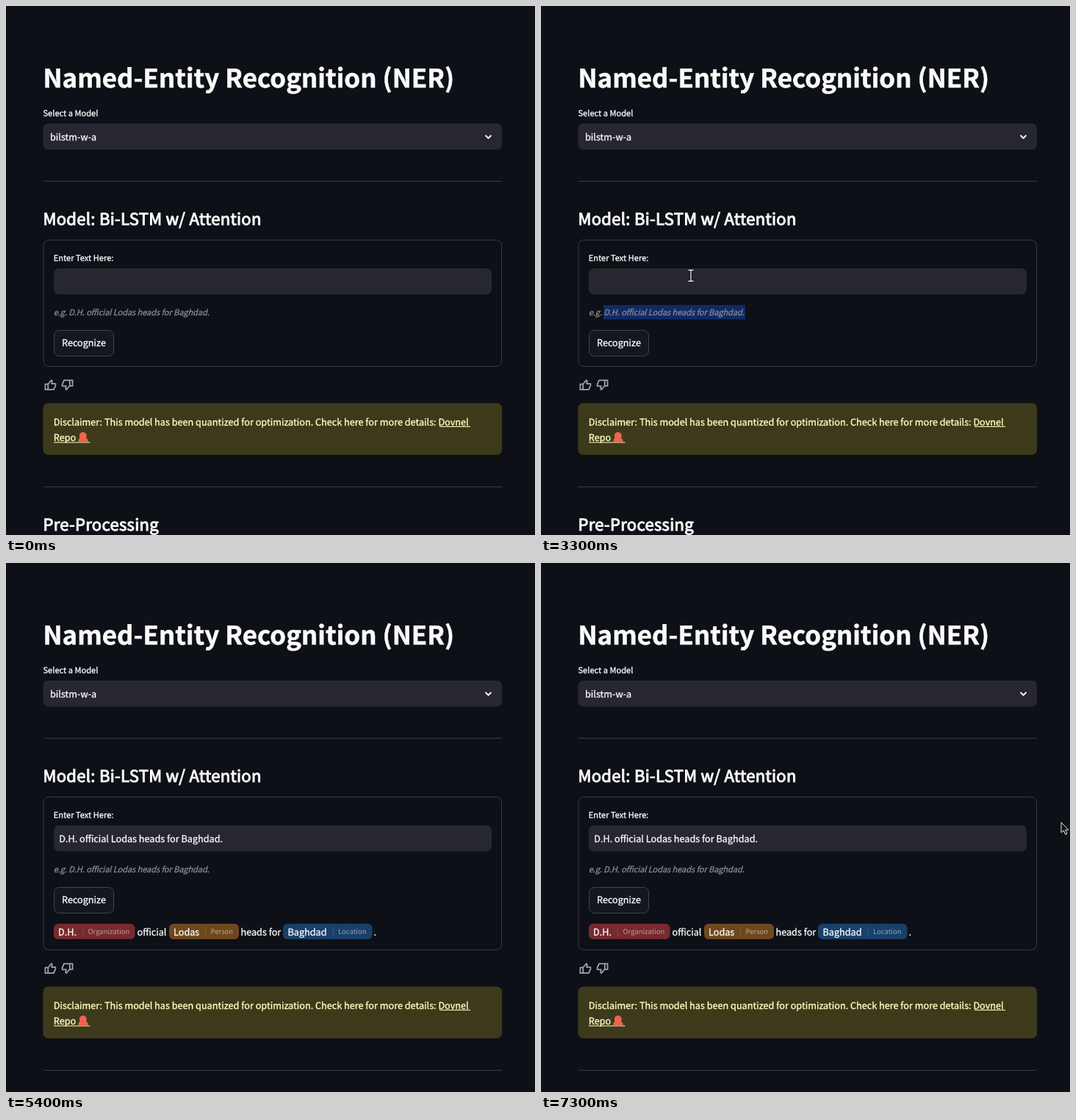
An HTML page that plays this animation: 720 px wide and 720 px high, repeating every 7400 ms.

```html
<!DOCTYPE html>
<html lang="en">
<head>
<meta charset="utf-8">
<title>Named-Entity Recognition</title>
<style>
  html, body { margin: 0; width: 100%; height: 100%; overflow: hidden; background: #0e1017; }
  svg { display: block; width: 100%; height: 100%; }
  text {
    font: 12.66px "Noto Sans CJK JP", "Noto Sans CJK SC", "Noto Sans CJK", "Noto Sans", sans-serif;
    fill: #fafafa; stroke: #fafafa; stroke-width: .32px;
    text-rendering: geometricPrecision;
  }
  .title { font-size: 34.8px; font-weight: 700; letter-spacing: .06px; stroke-width: .6px; }
  .heading { font-size: 22.1px; letter-spacing: .26px; stroke-width: 1px; }
  .label { font-size: 11.08px; }
  .caption { font-size: 11.08px; font-style: italic; letter-spacing: -.1px; fill: #87888c; stroke: #87888c; }
  .hint { font-size: 9.5px; fill: #9fa0a5; stroke: none; }
  .tag { font-size: 9.5px; fill: #fff; fill-opacity: .52; stroke: none; }
  .note { fill: #ffffc2; stroke: #ffffc2; }
  .widget { fill: #262730; }
  .line { fill: none; stroke: #393b41; }
  .icon { fill: none; stroke: #a3a4a7; stroke-width: 2.5; stroke-linejoin: round; }
  .button rect { fill: #131720; stroke: #41444c; }
  .button.hot rect { stroke: #ec4a45; }
  .button.hot text { fill: #ec4a45; stroke: #ec4a45; }
</style>
</head>
<body>
<svg viewBox="0 0 720 720">
  <defs>
    <path id="thumb" class="icon" d="M2 10H7.500V21H2ZM7.500 10L14 2.500L15.500 4L14.500 9.500H22V13L18.500 21H7.500"/>
  </defs>

  <text class="title" x="50.400" y="111">Named-Entity Recognition (NER)</text>
  <text class="label" x="50.500" y="150">Select a Model</text>
  <rect class="widget" x="50.500" y="160" width="624.500" height="35.500" rx="7"/>
  <text x="60" y="183">bilstm-w-a</text>
  <path d="M652.500 176l4 4 4-4" fill="none" stroke="#fafafa" stroke-width="1.900"/>
  <path class="line" d="M51 238.500H675"/>

  <text class="heading" x="50.500" y="298">Model: Bi-LSTM w/ Attention</text>
  <rect id="form" class="line" x="51" y="318.500" width="623.500" height="172" rx="7"/>
  <text class="label" x="64.800" y="347">Enter Text Here:</text>
  <rect class="widget" x="65" y="357" width="596" height="35.500" rx="7"/>
  <g id="focus">
    <rect x="65.400" y="357.500" width="595.200" height="34.500" rx="7" fill="none" stroke="#e24749"/>
    <path id="caret" d="M296.500 367V384" stroke="#fafafa"/>
  </g>
  <g id="pasted">
    <text x="72.200" y="380">D.H. official Lodas heads for Baghdad.</text>
    <g id="entry">
      <path id="squiggle" fill="none" stroke="#d8343c"/>
      <text class="hint" x="535.800" y="388">Press Enter to submit form</text>
    </g>
  </g>

  <rect id="selection" y="407" height="19.500" fill="#0f2a66"/>
  <text class="caption" x="64.800" y="421">e.g. D.H. official Lodas heads for Baghdad.</text>
  <g id="button" class="button">
    <rect x="65.500" y="441.500" width="81" height="35" rx="7"/>
    <text x="76" y="463">Recognize</text>
  </g>

  <g id="result">
    <rect x="65" y="491" width="110.500" height="21" rx="6" fill="#762a2f"/>
    <rect x="222" y="491" width="95" height="21" rx="6" fill="#6e481d"/>
    <rect x="377" y="491" width="121.500" height="21" rx="6" fill="#193f6b"/>
    <path d="M104.500 495V508M271.500 495V508M445.500 495V508" stroke="#fff" stroke-opacity=".12"/>
    <text x="71" y="507">D.H.</text><text class="tag" x="111.500" y="505">Organization</text>
    <text x="178.500" y="507">official</text>
    <text x="228" y="507">Lodas</text><text class="tag" x="278.500" y="505">Person</text>
    <text x="319.500" y="507">heads for</text>
    <text x="383.500" y="507">Baghdad</text><text class="tag" x="452" y="505">Location</text>
    <text x="500.500" y="507">.</text>
  </g>

  <g id="below">
    <use href="#thumb" transform="translate(52 507.500) scale(.7)"/>
    <use href="#thumb" transform="translate(92 524) rotate(180) scale(.7)"/>
    <rect x="50.500" y="540.500" width="624.500" height="70.500" rx="7" fill="#3d3a1b"/>
    <text class="note" x="64.800" y="570.500">Disclaimer: This model has been quantized for optimization. Check here for more details: Dovnel</text>
    <text class="note" x="64.800" y="592">Repo</text>
    <path d="M590 572.500H632M65 594H114.500" stroke="#ffffc2"/>
    <g fill="#f0634f">
      <circle cx="104.800" cy="585" r="5"/>
      <path d="M101 587H108.500L111.500 590.500V593.500H98.500V590.500Z"/>
    </g>
    <path class="line" d="M51 654.500H675"/>
    <text class="heading" x="50.500" y="714">Pre-Processing</text>
  </g>

  <g id="beam" fill="none">
    <path d="M-3-7.500H3M-3 7.500H3M0-7.500V7.500" stroke="#0b0c10" stroke-width="3.400"/>
    <path d="M-3.500-7.500H3.500M-3.500 7.500H3.500M0-7.500V7.500" stroke="#f4f4f4" stroke-width="1.300"/>
  </g>
  <path id="arrow" d="M0 0V14L3.300 11L5.700 16.500L8 15.500L5.700 10.200H10Z" fill="#101218" stroke="#e8e8e8"/>
</svg>
<script>
  const LOOP = 7400, STEP = 100, SHIFT = 36;
  const FOCUS = 3400, PASTE = 3600, HOVER = 4500, SUBMIT = 4800, RESULT = 5400;
  const $ = id => document.getElementById(id);
  const show = (id, on) => $(id).setAttribute('visibility', on ? 'visible' : 'hidden');
  const within = (t, from, to) => t >= from && t < to;

  // Linear path through [time, ...values] keys.
  function along(keys, t) {
    const next = keys.findIndex(k => k[0] > t);
    if (next === 0) return keys[0].slice(1);
    if (next < 0) return keys[keys.length - 1].slice(1);
    const a = keys[next - 1], b = keys[next];
    const p = (t - a[0]) / (b[0] - a[0]);
    return a.slice(1).map((v, i) => v + (b[i + 1] - v) * p);
  }

  const beamPath = [
    [1000, 330, 715], [1400, 290, 419], [1600, 290, 419], [1900, 163, 419],
    [2400, 84, 419], [2600, 124, 418], [2700, 124, 418], [3300, 204, 367],
    [3800, 204, 370], [4200, 197, 391], [4600, 122, 461]
  ];
  const arrowPath = [[6900, 718, 340], [7300, 708, 353]];
  const selectionPath = [[1600, 278], [1900, 178], [2300, 85]];

  let wave = 'M144 383.5';
  for (let i = 0; i < 17; i++) wave += `l2 ${i % 2 ? -2 : 2}`;
  $('squiggle').setAttribute('d', wave);

  function place(id, path, t) {
    $(id).setAttribute('transform', `translate(${along(path, t)})`);
  }

  function draw(now) {
    const t = Math.floor(now % LOOP / STEP) * STEP;
    const done = t >= RESULT;

    const [left] = along(selectionPath, t);
    $('selection').setAttribute('x', left);
    $('selection').setAttribute('width', 278 - left);
    show('selection', within(t, 1700, FOCUS));

    show('focus', within(t, FOCUS, SUBMIT));
    $('caret').setAttribute('transform', `translate(${t < PASTE ? -224 : 0})`);
    show('pasted', t >= PASTE);
    show('entry', within(t, PASTE, SUBMIT));
    $('button').classList.toggle('hot', within(t, HOVER, RESULT));

    show('result', done);
    $('form').setAttribute('height', done ? 172 + SHIFT : 172);
    $('below').setAttribute('transform', `translate(0 ${done ? SHIFT : 0})`);

    show('beam', within(t, 1000, 4700));
    place('beam', beamPath, t);
    show('arrow', t >= 6900);
    place('arrow', arrowPath, t);
  }

  let start;
  function tick(now) {
    start ??= now;
    draw(now - start);
    requestAnimationFrame(tick);
  }
  draw(0);
  requestAnimationFrame(tick);
</script>
</body>
</html>
```
